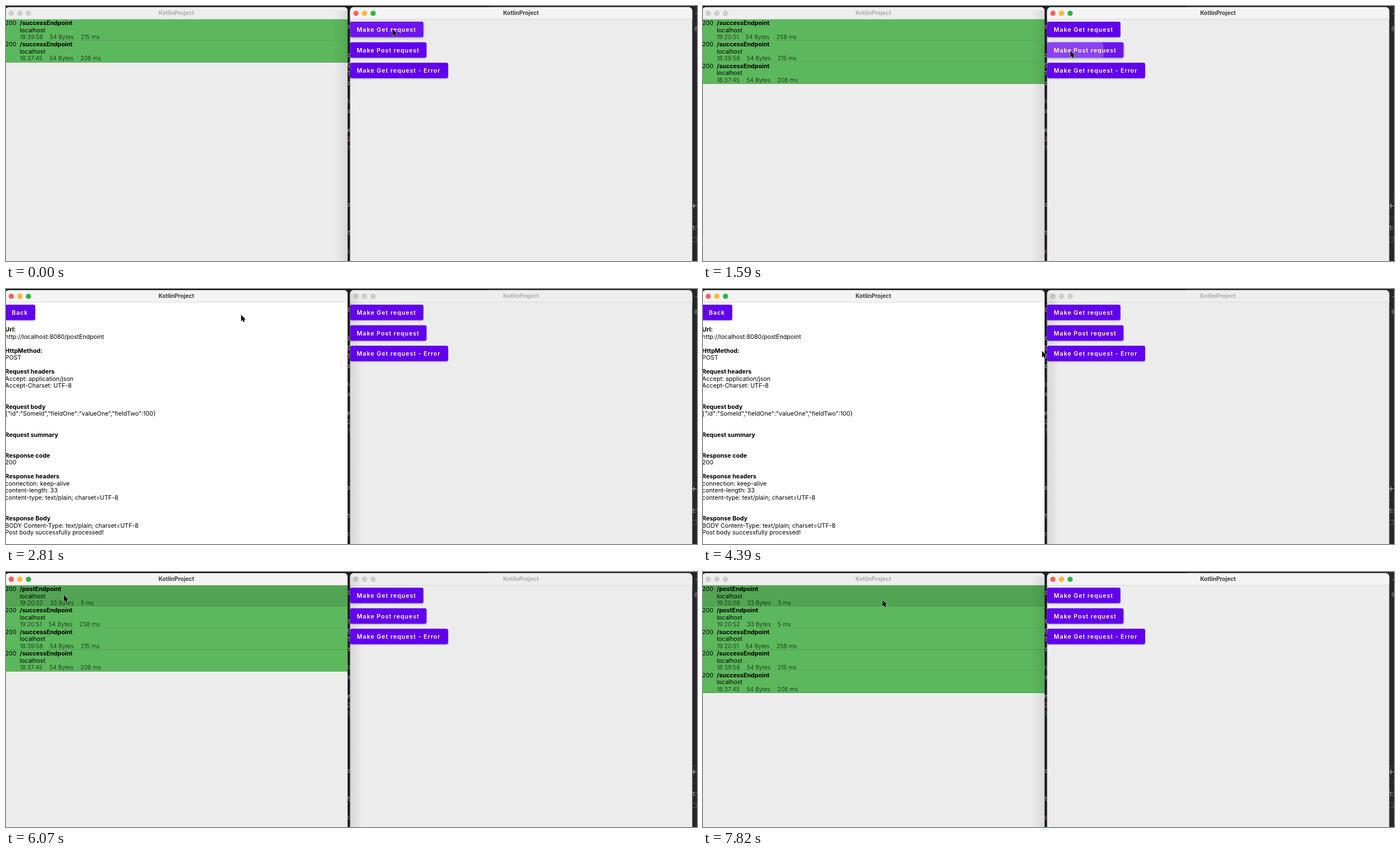
Recreate the animation shown at these times as an HTML page. Size 1230x455 px, loop 8000 ms.

```html
<!DOCTYPE html>
<html lang="en">
<head>
<meta charset="utf-8">
<title>KotlinProject</title>
<style>
  html, body { margin: 0; width: 100%; height: 100%; overflow: hidden; background: #1f2023; }
  svg { display: block; font: 10.65px Inter, "Open Sans", sans-serif; white-space: pre; }
  .bold { font-weight: 700; }
  .title { font-size: 10.1px; font-weight: 700; text-anchor: middle; }
  .label { font-size: 10.7px; font-weight: 600; letter-spacing: .92px; fill: #fff; }
  .meta { font-size: 10.4px; font-weight: 300; fill: #0d200d; }
  .code { font: 10px "Noto Sans Mono", monospace; }
  .button { filter: drop-shadow(0 1px 1px #0005); }
  .button.hover { filter: drop-shadow(0 1.5px 2px #0006); }
</style>
</head>
<body>
<svg id="stage" width="1230" height="455" viewBox="0 0 1230 455"></svg>
<script>
const LOOP = 8000, STEP = 87.8, LEAD = 9;
const ROW_TOP = 23.8, ROW_H = 38.4, LEFT_END = 608;

// Cursor path: step, x, y
const path = [
  [0, 688, 41], [9, 688, 41], [16, 654, 80], [20, 654, 80], [24, 421, 46],
  [27, 418.5, 46], [33, 418.5, 46], [34, 200, 67], [35, 104, 63], [36, 104, 63],
  [39, 36, 44], [40, 36, 44], [44, 250, 122], [47, 490, 128], [50, 603.5, 110.5],
  [53, 632, 108], [55, 622, 104], [60, 61, 43], [62, 34, 42], [66, 40, 42],
  [69, 103, 41], [73, 520, 112], [74, 618, 129], [75, 618, 129], [79, 655, 80],
  [85, 655, 79], [87, 450, 70], [88, 352, 54], [89, 319.5, 50], [92, 319.5, 50]
];
const presses = [0.6, 17.6, 27.6, 63.6, 82.6];

// Newest first, with the step at which each request shows up
const requests = [
  [84, "/postEndpoint", "19:20:58", 33, 3],
  [20, "/postEndpoint", "19:20:52", 33, 5],
  [4, "/successEndpoint", "19:20:51", 54, 258],
  [0, "/successEndpoint", "18:39:58", 54, 215],
  [0, "/successEndpoint", "18:37:45", 54, 208]
];

const details = `*Url:
http://localhost:8080/postEndpoint

*HttpMethod:
POST

*Request headers
Accept: application/json
Accept-Charset: UTF-8


*Request body
{"id":"SomeId","fieldOne":"valueOne","fieldTwo":100}


*Request summary


*Response code
200

*Response headers
connection: keep-alive
content-length: 33
content-type: text/plain; charset=UTF-8


*Response Body
BODY Content-Type: text/plain; charset=UTF-8
Post body successfully processed!`.split("\n");

const actions = [
  { x: 612.5, y: 28, w: 130.5, h: 27.5, label: "Make Get request" },
  { x: 612.5, y: 64.7, w: 136, h: 27.5, label: "Make Post request" },
  { x: 612.5, y: 101.2, w: 174.5, h: 27.5, label: "Make Get request - Error" }
];
const back = { x: -4, y: 28, w: 56, h: 27.5, label: "Back", textX: 10.2 };

// Bits of the editor that show between and beside the windows: y, text, colour
const editorBits = [
  [40, "r"], [91, "r"], [107, "g"], [124, "T"], [141, "r"], [174, "N", "#666"],
  [191, "a", "#b877c4"], [225, "e"], [241, "2", "#c75b6d"], [257, "?", "#777"],
  [358, "r"], [408, "t"], [441, "c", "#cf5d86"]
];

const rect = (x, y, w, h, fill, more = "") =>
  `<rect x="${x}" y="${y}" width="${w}" height="${h}" fill="${fill}" ${more}/>`;
const text = (x, y, str, cls = "", fill = "") =>
  `<text x="${x}" y="${y}" class="${cls}" ${fill && `fill="${fill}"`}>${str}</text>`;
const clamp = v => Math.max(0, Math.min(1, v));

const detailsOpen = s => s >= 30 && s < 66;
const leftFocused = s => s >= 26 && s < 80;

function cursorAt(s) {
  const i = Math.max(1, path.findIndex(p => p[0] >= s));
  const [a, b] = [path[i - 1], path[i]];
  const u = (s - a[0]) / (b[0] - a[0]);
  return [a[1] + (b[1] - a[1]) * u, a[2] + (b[2] - a[2]) * u];
}

function rowsAt(s) {
  return requests.filter(r => s >= r[0]).map((r, i) =>
    ({ x: 0, y: ROW_TOP + i * ROW_H, w: LEFT_END, h: ROW_H, request: r }));
}

const targetsAt = s => [...actions, ...(detailsOpen(s) ? [back] : rowsAt(s))];

function hitAt(s) {
  const [x, y] = cursorAt(s);
  return targetsAt(s).find(t => x >= t.x && x < t.x + t.w && y >= t.y && y < t.y + t.h);
}

function ripple(box, s) {
  const start = presses.findLast(p => p <= s);
  const age = (s - start) * STEP;
  if (!(age < 400)) return "";
  const hit = hitAt(start);
  if (!hit || hit.label !== box.label || hit.y !== box.y) return "";
  const p = 1 - (1 - clamp(age / 225)) ** 2;
  const [x, y] = cursorAt(start);
  const from = Math.max(box.w, box.h) * .3, to = Math.hypot(box.w, box.h) / 2 + 10;
  const cx = x + (box.x + box.w / 2 - x) * p, cy = y + (box.y + box.h / 2 - y) * p;
  const alpha = clamp((400 - age) / 150) * (box.label ? .2 : .12);
  return `<clipPath id="ripple">${rect(box.x, box.y, box.w, box.h, "#000", box.label ? 'rx="3"' : "")}</clipPath>
    <circle cx="${cx}" cy="${cy}" r="${from + (to - from) * p}" clip-path="url(#ripple)"
      fill="${box.label ? "#fff" : "#000"}" opacity="${alpha}"/>`;
}

function button(b, s, hovered) {
  const shape = fill => rect(b.x, b.y, b.w, b.h, fill, 'rx="3"');
  return `<g class="button ${hovered ? "hover" : ""}">${shape("#6200ee")}</g>` +
    (hovered ? shape("#ffffff14") : "") + ripple(b, s) +
    text(b.textX ?? b.x + 11.8, b.y + 17.8, b.label, "label");
}

function row(r, s, hovered) {
  const [, name, time, bytes, ms] = r.request;
  return rect(0, r.y, r.w, r.h, "#5cb85c") +
    (hovered ? rect(0, r.y, r.w, r.h, "#0000001c") : "") + ripple(r, s) +
    rect(0, r.y + r.h - .9, r.w, .9, "#4a994a") +
    text(-1.4, r.y + 10.2, "200") +
    text(24.5, r.y + 10.2, name, "bold") +
    text(24.5, r.y + 22.8, "localhost") +
    text(24.5, r.y + 35.2, `${time}<tspan dx="12.3">${bytes} Bytes</tspan><tspan dx="12.3">${ms} ms</tspan>`, "meta");
}

function frame(x, w, focused, body) {
  const lights = focused ? ["#ff5f57", "#febc2e", "#28b93c"] : ["#cfcecf", "#cfcecf", "#cfcecf"];
  return rect(x, 2, w, 470, body, 'rx="7"') +
    `<path d="M${x} 24V9q0-7 7-7H${x + w - 7}q7 0 7 7V24Z" fill="${focused ? "#f5f4f5" : "#efeeef"}"/>` +
    rect(x, 23.2, w, .8, "#d6d5d6") +
    lights.map((c, i) => `<circle cx="${x + 10.4 + i * 15.3}" cy="13" r="4.6" fill="${c}"
      stroke="#000" stroke-opacity=".1" stroke-width=".6"/>`).join("") +
    text(x + w / 2 - .3, 16.4, "KotlinProject", "title", focused ? "#3b3a3b" : "#adacad");
}

const backdrop = rect(0, 0, 860, 2, "#17181a") + rect(860, 0, 370, 2, "#2b2c2f") +
  rect(1221, 0, 9, 455, "#26272a") + rect(1221, 346, 9, 1, "#3c3d40") + rect(1221, 376, 9, 1, "#3c3d40") +
  editorBits.map(([y, str, fill = "#a5a8ad"]) => text(607.5, y, str, "code", fill)).join("") +
  text(1226, 16, "–", "code", "#999") + text(1225.5, 44, "@", "code", "#888") +
  `<path d="M1220 356.5h9M1224.5 352v9" stroke="#c4c4c4"/>` +
  text(1221, 400, "1:1", "", "#c0c0c0") +
  `<path d="M1222 412.5h7v8h-7" fill="none" stroke="#55565a"/>`;

const defs = `<defs>
  <linearGradient id="toRight"><stop stop-opacity="0"/><stop offset="1" stop-opacity=".09"/></linearGradient>
  <linearGradient id="toLeft"><stop stop-opacity=".09"/><stop offset="1" stop-opacity="0"/></linearGradient></defs>`;

function leftWindow(s, hit) {
  const open = detailsOpen(s);
  const content = open
    ? button(back, s, hit === back) + details.map((line, i) =>
        text(-1.4, 76.3 + i * 12.48, line.replace("*", ""), line[0] === "*" ? "bold" : "")).join("")
    : rowsAt(s).map(r => row(r, s, hit && hit.request === r.request)).join("");
  return frame(-1, LEFT_END + 1, leftFocused(s), open ? "#fff" : "#ededed") + content;
}

function scene(s) {
  const hit = hitAt(s), focus = leftFocused(s), [x, y] = cursorAt(s);
  return defs + backdrop + leftWindow(s, hit) +
    (focus ? "" : rect(584, 8, 24, 447, "url(#toRight)")) +
    frame(612.5, 609, !focus, "#ececec") +
    (focus ? rect(612.5, 8, 22, 447, "url(#toLeft)") : "") +
    actions.map(b => button(b, s, hit === b)).join("") +
    `<path transform="translate(${x} ${y})" d="M0 0V11.6L2.6 9.2 4.4 13.2 6.4 12.3 4.7 8.4H8.2Z"
      stroke="#fff" stroke-width=".9" stroke-linejoin="round" paint-order="stroke"/>`;
}

const stage = document.getElementById("stage");
const begin = performance.now();
let shown = -1;
function draw() {
  const step = Math.floor(((performance.now() - begin) % LOOP + LEAD) / STEP);
  if (step !== shown) stage.innerHTML = scene(shown = step);
  requestAnimationFrame(draw);
}
draw();
</script>
</body>
</html>
```
